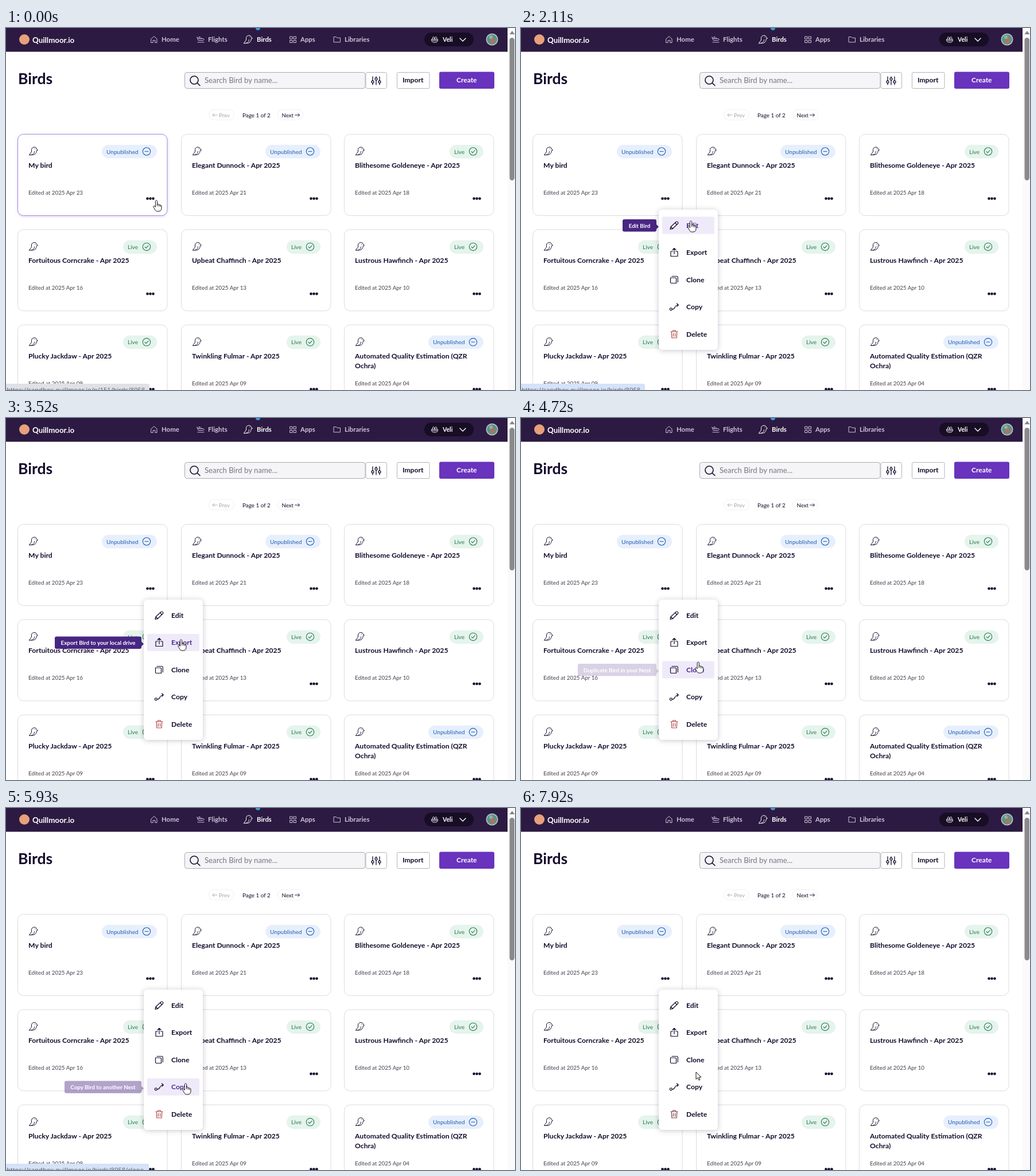
These frames come from a looping animation (887 by 632 pixels, 7.99 s). An HTML page:

```html
<!DOCTYPE html>
<html lang="en">
<head>
<meta charset="utf-8">
<title>Birds</title>
<style>
  html, body { margin: 0; width: 100%; height: 100%; overflow: hidden; background: #fff; }
  svg { display: block; font-family: Lato, sans-serif; }
  #menu { filter: drop-shadow(0 1px 5px rgba(20, 10, 40, .24)); }
  .frame { stroke: #dcdce1; }
  .frame.over { stroke: #a48be0; filter: drop-shadow(0 1px 2px rgba(105, 51, 189, .25)); }
</style>
</head>
<body>
<svg id="stage" width="887" height="632" viewBox="0 0 887 632"></svg>
<script>
const INK = '#150a2b', PURPLE = '#482683', LOOP = 7990;

// Markup helpers
const text = (x, y, str, size, fill = INK, weight = 400, more = '') =>
  `<text x="${x}" y="${y}" font-size="${size}" fill="${fill}" font-weight="${weight}" ${more}>${str}</text>`;
const box = (x, y, w, h, r, fill, more = '') =>
  `<rect x="${x}" y="${y}" width="${w}" height="${h}" rx="${r}" fill="${fill}" ${more}/>`;
const outlined = (x, y, w, h, r, fill, stroke) => box(x, y, w, h, r, fill, `stroke="${stroke}"`);
const disc = (x, y, r, fill, more = '') => `<circle cx="${x}" cy="${y}" r="${r}" fill="${fill}" ${more}/>`;
const line = (d, x, y, stroke = INK, width = 1.1) =>
  `<path d="${d}" transform="translate(${x} ${y})" fill="none" stroke="${stroke}" stroke-width="${width}" stroke-linecap="round" stroke-linejoin="round"/>`;
const group = (id, content, more = '') => `<g id="${id}" ${more}>${content}</g>`;

// Icon outlines, each centred on 0,0
const icons = {
  bird: 'M-7.5 6.5L-3.5 1V-2.5C-3.5-5.5-1-7 1.5-7C3.8-7 5.3-5.6 5.3-3.5L7.5-2L5.3-1C5 4 2 6.5-1.5 6.5ZM-3.5 6.3C0 5.5 1.5 3.5 1.5.5M2.4-4h.1',
  home: 'M-5-1L0-5.5L5-1V5.5H1.8V1.5H-1.8V5.5H-5Z',
  plane: 'M-6-4L-4-1.5H4.5C6.5-1.5 6.5 1.5 4.5 1.5H-3.5ZM-2-1.5L-3-4.5H-1L2-1.5M-5 4.8H6',
  grid: 'M-5-5H-1V-1H-5ZM1.5-5H5.5V-1H1.5ZM-5 1.5H-1V5.5H-5ZM1.5 1.5H5.5V5.5H1.5Z',
  folder: 'M-5.5-4.5H-1.5L0-2.8H5.5V4.8H-5.5Z',
  nest: 'M-5.5 0H5.5C5.5 3.5 4 5 2 5H-2C-4 5-5.5 3.5-5.5 0ZM-4.5 2.2H4.5M-3.5-.5V-3.5Q-2-6-.7-3.5V-.5M.7-.5V-3.5Q2.2-6 3.7-3.5V-.5',
  edit: 'M-7 7L-6 2.5L3.5-6.2Q5-7 6.3-5.6Q7.5-4.2 6.4-3L-2.8 6ZM1.5-4.5L4.5-1.2M-6 2.5L-2.8 6',
  export: 'M-2.5-2H-6V6.5H6V-2H2.5M0 2.5V-7.3M-3-4.5L0-7.5L3-4.5',
  clone: 'M-6.5-3.5H2Q3.5-3.5 3.5-2V6H-5Q-6.5 6-6.5 4.5ZM-4-6H4.5Q6.3-6 6.3-4.2V4',
  copy: 'M-7.7 3.8A2 2 0 1 0-3.7 3.8A2 2 0 1 0-7.7 3.8M-3.5 4C2 5 0-3.5 7-3.5M4.5-6L7.3-3.5L4.8-.8',
  delete: 'M-6-4.5H6M-2.3-4.5V-6.5H2.3V-4.5M-4.8-4.5L-4.2 6.5H4.2L4.8-4.5M-1.6-1.5V3.8M1.6-1.5V3.8',
  ring: 'M-6.7 0A6.7 6.7 0 1 0 6.7 0A6.7 6.7 0 1 0-6.7 0',
  minus: 'M-3 0H3',
  check: 'M-3 .2L-.8 2.3L3-2',
  left: 'M4 0H-4M-1.2-2.6L-4 0L-1.2 2.6',
  right: 'M-4 0H4M1.2-2.6L4 0L1.2 2.6',
};

function header() {
  const nav = [['home', 258, 'Home', 271], ['plane', 339, 'Flights', 352], ['bird', 422, 'Birds', 437],
               ['grid', 500, 'Apps', 513], ['folder', 577, 'Libraries', 590]];
  return box(0, 0, 874, 41.5, 0, '#2c1a42') +
    disc(32, 20, 9, '#e8a07c') + text(46, 26, 'Quillmoor.io', 13.3, '#fff', 700) +
    disc(439, 0, 4, '#3f93d8') +
    nav.map(([icon, x, label, tx]) => {
      const color = icon === 'bird' ? '#fff' : '#cdc3d8';
      return line(icons[icon], x, 20, color, 1) + text(tx, 24, label, 11.4, color, 700);
    }).join('') +
    box(729, 8, 86, 24, 12, '#170d24') + line(icons.nest, 747, 20, '#e6e0ee', 1) +
    text(761, 24, 'Veli', 10.5, '#fff', 700) + line('M-5-2.5L0 2.5L5-2.5', 796, 20.5, '#fff', 1.4) +
    disc(847, 20, 10.5, '#b9c9c4') + disc(847, 20, 9, '#5d918d') +
    '<ellipse cx="848" cy="22" rx="4" ry="6" fill="#a9775f"/>' + disc(845, 16, 3, '#86b8a0');
}

function toolbar() {
  const slider = (x, knob) => line(`M0-7V${knob - 2}M0 ${knob + 2}V7M-2 ${knob}a2 2 0 1 0 4 0a2 2 0 1 0-4 0`, x, 92, INK, 1.3);
  return text(21, 98, 'Birds', 26.5, INK, 700) +
    outlined(311.5, 77.5, 314.5, 28, 4, '#f5f5f8', '#a9a9b2') +
    line('M-7 0A7 7 0 1 0 7 0A7 7 0 1 0-7 0M5.2 5.2L10 9.5', 328, 91, INK, 1.6) +
    text(346, 96, 'Search Bird by name...', 13.2, '#77777f') +
    outlined(627, 77.5, 36.5, 28, 3, '#fff', '#b4b4bc') + slider(639, 2) + slider(645, -3) + slider(651, 2) +
    outlined(681.5, 77.5, 56.5, 28, 2, '#fff', '#b4b4bc') + text(691, 95, 'Import', 12.1, INK, 700) +
    box(755, 76.5, 96, 29.5, 3, '#6933bd') + text(785, 95, 'Create', 12, '#fff', 700) +
    outlined(353.5, 142.5, 44, 18, 9, '#fff', '#f1f1f4') + line(icons.left, 364, 152, '#a8a8b0', .9) +
    text(371, 155.5, 'Prev', 9.7, '#a8a8b0') + text(412, 155.5, 'Page 1 of 2', 9.9) +
    outlined(473.5, 142.5, 44, 18, 9, '#fff', '#f1f1f4') + text(480.5, 155.5, 'Next', 9.6) +
    line(icons.right, 507.5, 152, INK, .9);
}

function card([title, day, live, secondLine = ''], i) {
  const x = Math.round(284.6 * (i % 3)), y = 166.4 * Math.floor(i / 3);
  const [label, left, tint, color, mark] = live
    ? ['Live', 204, '#e5f4ec', '#2b7a52', 'check']
    : ['Unpublished', 167, '#e7effc', '#1f5fb4', 'minus'];
  return `<g transform="translate(${x} ${y})">` +
    box(20.5, 185.5, 260.5, 142, 10, '#fff', 'class="frame"') +
    line(icons.bird, 48, 215, INK, 1) + box(left, 204, 263 - left, 23.5, 11.75, tint) +
    text(left + 8, 219.5, label, 10.1, color) +
    line(icons.ring, 245, 215.5, color) + line(icons[mark], 245, 215.5, color) +
    text(39, 244, title, 12.2, INK, 700) + text(39, 261.5, secondLine, 12.2, INK, 700) +
    text(39, 291, `Edited at 2025 Apr ${day}`, 9.8, '#43404e') +
    (i ? '' : disc(252, 297.5, 12, '#ece6f7', 'id="dotsHover"')) +
    [246.5, 251.5, 256.5].map(cx => disc(cx, 297.7, 2.3, INK)).join('') + '</g>';
}

const cards = [
  ['My bird', 23, 0], ['Elegant Dunnock - Apr 2025', 21, 0], ['Blithesome Goldeneye - Apr 2025', 18, 1],
  ['Fortuitous Corncrake - Apr 2025', 16, 1], ['Upbeat Chaffinch - Apr 2025', 13, 1], ['Lustrous Hawfinch - Apr 2025', 10, 1],
  ['Plucky Jackdaw - Apr 2025', '09', 1], ['Twinkling Fulmar - Apr 2025', '09', 1],
  ['Automated Quality Estimation (QZR', '04', 0, 'Ochra)'],
];

// Menu items: tooltip text, its left edge, and when it fades in and out
const items = [
  { name: 'Edit', tip: 'Edit Bird', left: 177, show: 1740, hide: 2760 },
  { name: 'Export', tip: 'Export Bird to your local drive', left: 85, show: 3270, hide: 4400 },
  { name: 'Clone', tip: 'Duplicate Bird in your Nest', left: 99, show: 4672, hide: 5550 },
  { name: 'Copy', tip: 'Copy Bird to another Nest', left: 102, show: 5830, hide: 6700 },
  { name: 'Delete', tip: 'Delete Bird', left: 166, show: 7180, hide: 7720 },
];
const itemY = i => 344.5 + 47.5 * i;

const menuItem = ({ name }, i) =>
  box(246, itemY(i) - 15, 91, 30, 2, '#efeaf9', 'class="hover"') +
  line(icons[name.toLowerCase()], 267, itemY(i), name === 'Delete' ? '#b04848' : INK, 1.2) +
  text(288, itemY(i) + 4.3, name, 12.2, INK, 700, 'class="label"');

const tooltip = ({ tip, left }, i) => group('tip' + i,
  box(left, itemY(i) - 10.5, 151 + 85 - left, 21.5, 3, PURPLE) +
  `<path d="M235.5 ${itemY(i) - 2}l4.5 4.5l-4.5 4.5z" fill="${PURPLE}"/>` +
  text((left + 236) / 2, itemY(i) + 4, tip, 9.8, '#fff', 700, 'text-anchor="middle"'));

const statuses = [
  { path: 'n/151/birds/8958', width: 250, fill: '#dfe1e6', show: -500, hide: 100 },
  { path: 'birds/8958', width: 216, fill: '#d5e2f8', show: 1930, hide: 2860 },
  { path: 'birds/8958/clone', width: 249, fill: '#d5e2f8', show: 5040, hide: 6000 },
];
const status = ({ path, width, fill }, i) => group('status' + i,
  box(-4, 621, width + 4, 20, 3, fill) +
  text(1, 635.5, `https://sandbox.quillmoor.io/${path}`, 11.1, '#566070', 400, 'font-family="Open Sans, sans-serif"'));

const scrollbar = box(874, 0, 13, 632, 0, '#fafafa') + box(877.5, 17, 8.5, 249, 4.2, '#8a8a8a') +
  '<path d="M877.5 11L882 5L886.5 11Z" fill="#858585"/>';

const pointer = group('hand', '<path d="M-1.6 1.5C-1.6-.5 1.6-.5 1.6 1.5V7C2.5 6 4 6.3 4.3 7.5C5.2 6.8 6.6 7.3 6.8 8.5C8 8 9 8.8 9 10V13.5C9 17 7 19 4 19H1.5C-1 19-2 17-3 15L-5 11.5C-5.6 10-4 9-2.8 10L-1.6 11.5ZM1.6 7V10M4.3 7.5V10.5M6.8 8.5V11"/>') +
  group('arrow', '<path d="M0 0V12.5L3 9.8L5 14.3L7 13.4L5 9H9Z"/>');

const stage = document.getElementById('stage');
stage.innerHTML = header() + toolbar() + cards.map(card).join('') + scrollbar +
  statuses.map(status).join('') + items.map(tooltip).join('') +
  group('menu', box(240, 317, 103, 245, 6, '#fff') + items.map(menuItem).join('')) +
  group('cursor', pointer, 'fill="#fff" stroke="#111" stroke-linejoin="round"');

const $ = id => document.getElementById(id);
const hovers = stage.querySelectorAll('.hover'), labels = stage.querySelectorAll('.label');
const firstFrame = stage.querySelector('.frame');
const trash = labels[4].previousElementSibling;

// Pointer moves: start, end, and the place reached
const moves = [
  [20, 210, 259, 299], [1160, 1640, 296, 337], [2720, 3160, 305, 387], [4300, 4800, 309, 429],
  [5450, 5860, 313, 481], [6600, 7060, 309, 528], [7710, 7915, 305, 461],
];
const ramp = (t, from, to) => Math.min(1, Math.max(0, (t - from) / (to - from)));
const smooth = p => p * p * (3 - 2 * p);
const visible = (id, on) => $(id).style.display = on ? '' : 'none';
const fade = (id, opacity) => $(id).style.opacity = opacity;

function pointerAt(t) {
  let x = 262, y = 301;
  for (const [from, to, nextX, nextY] of moves) {
    const p = smooth(ramp(t, from, to));
    x += (nextX - x) * p;
    y += (nextY - y) * p;
  }
  return [x, y];
}

function draw(t) {
  const [x, y] = pointerAt(t);
  const open = ramp(t, 400, 560);
  const onCard = y < 317;
  const active = open === 1 ? items.findIndex((_, i) => Math.abs(y - itemY(i)) <= 15) : -1;

  $('cursor').setAttribute('transform', `translate(${x} ${y})`);
  visible('hand', onCard || active >= 0);
  visible('arrow', !onCard && active < 0);
  visible('dotsHover', Math.hypot(x - 252, y - 298) < 9);
  firstFrame.classList.toggle('over', onCard);

  visible('menu', open > 0);
  fade('menu', open);
  $('menu').setAttribute('transform', `translate(0 ${317 * .2 * (1 - open)}) scale(1 ${.8 + .2 * open})`);
  items.forEach(({ show, hide }, i) => {
    hovers[i].style.display = i === active ? '' : 'none';
    labels[i].setAttribute('fill', i === active ? '#4d2a94' : INK);
    fade('tip' + i, ramp(t, show, show + 240) * (1 - ramp(t, hide, hide + 140)));
  });
  trash.setAttribute('stroke', active === 4 ? '#33204f' : t > 7800 ? '#7d3c44' : '#b04848');
  statuses.forEach(({ show, hide }, i) =>
    fade('status' + i, ramp(t, show, show + 140) * (1 - ramp(t, hide, hide + 80))));
}

const start = performance.now();
function tick() {
  draw((performance.now() - start) % LOOP);
  requestAnimationFrame(tick);
}
tick();
</script>
</body>
</html>
```
